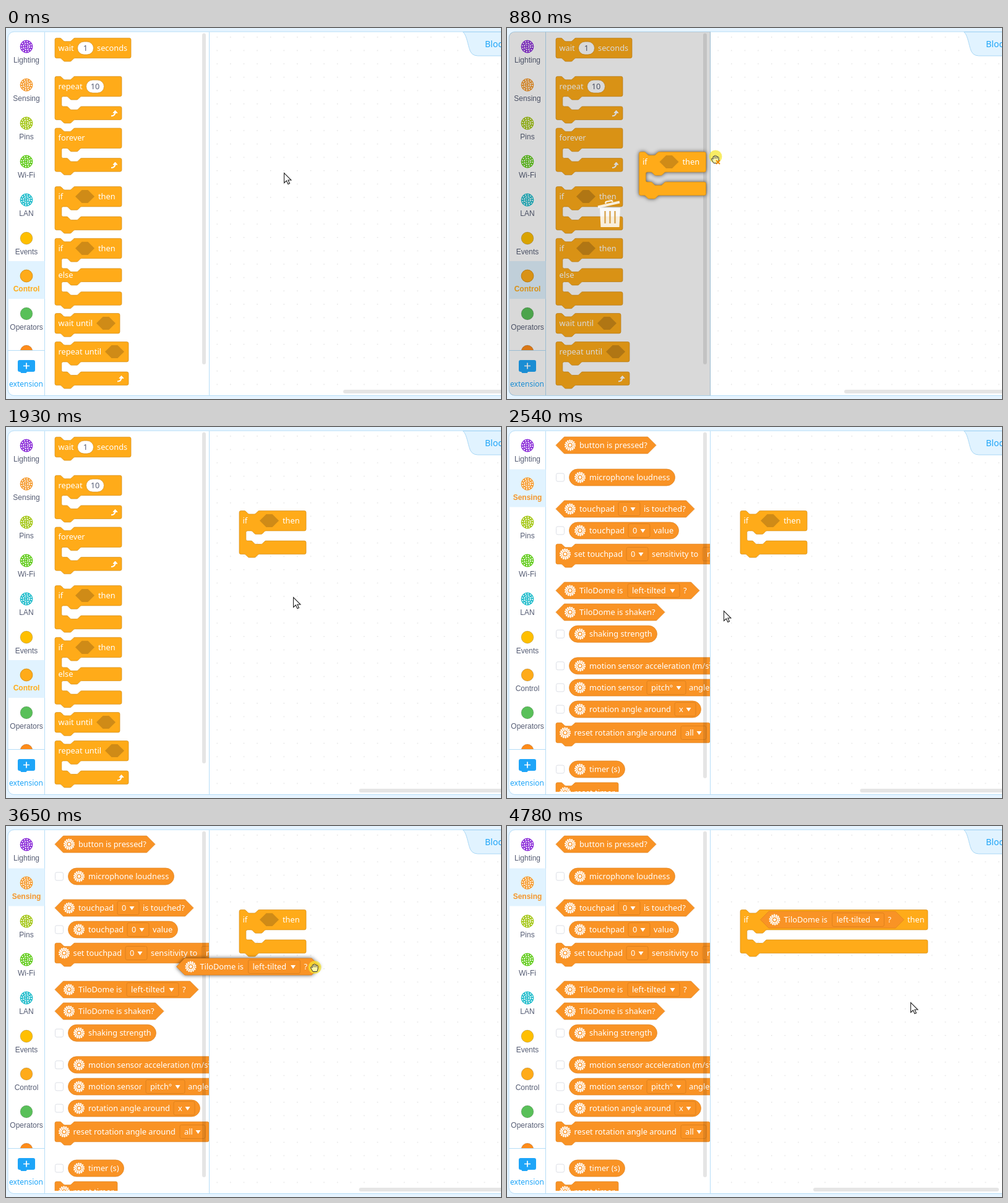
Recreate the animation shown at these times as an HTML page. Size 800 by 600 pixels, loop 5.05 s.

```html
<!DOCTYPE html>
<html lang="en">
<head>
<meta charset="utf-8">
<title>Block editor</title>
<style>
  html, body { margin: 0; width: 100%; height: 100%; overflow: hidden; background: #e6f4ff; }
  svg { display: block; width: 800px; height: 600px; }
  text { font: 12.8px "Noto Sans", sans-serif; fill: #fff; white-space: pre; }
  .side { font: 12px "Liberation Sans", Arial, sans-serif; fill: #575e75; text-anchor: middle; }
  .on { font-weight: bold; }
  .num { fill: #575e75; text-anchor: middle; }
  .blue { font-size: 12px; fill: #1ea5f8; }
  .control { fill: #ffab19; stroke: #cf8b17; }
  .sensing { fill: #f99325; stroke: #dd801c; }
  .slot { fill: #cf8b17; }
  .line { fill: none; stroke: #b5ddf7; }
  .bar { fill: #000; fill-opacity: .1; }
  .lifted { filter: drop-shadow(0 0 3px rgba(0,0,0,.65)); }
  .hidden { display: none; }
</style>
</head>
<body>
<svg id="stage" viewBox="0 0 800 600"></svg>
<script>
const LOOP = 5050, UNIT = 0.675, BOARD = 'TiloDome';

// ---- shapes -------------------------------------------------------------
const NOTCH = 'c2 0 3 1 4 2l4 4c1 1 2 2 4 2h12c2 0 3-1 4-2l4-4c1-1 2-2 4-2';
const NOTCH_BACK = 'c-2 0-3 1-4 2l-4 4c-1 1-2 2-4 2h-12c-2 0-3-1-4-2l-4-4c-1-1-2-2-4-2';
const CORNER = 'a4 4 0 0 1 4 4';

const at = (x, y, content) => `<g transform="translate(${x} ${y})">${content}</g>`;
const label = (x, y, s, cls = '') => `<text x="${x}" y="${y + 4.4}" class="${cls}">${s}</text>`;

// Stack block with one arm per row; a mouth opens between the arms.
function stack(kind, width, arms = 1) {
  const w = width / UNIT;
  let y = 48, d = `M0 4a4 4 0 0 1 4-4H12${NOTCH}H${w - 4}${CORNER}`;
  for (let i = 1; i < arms; i++) {
    d += `V${y - 4}a4 4 0 0 1-4 4H64${NOTCH_BACK}H20a4 4 0 0 0-4 4v16a4 4 0 0 0 4 4H28${NOTCH}H${w - 4}${CORNER}`;
    y += 56;
  }
  d += `V${y - 4}a4 4 0 0 1-4 4H48${NOTCH_BACK}H4a4 4 0 0 1-4-4z`;
  return `<path class="${kind}" transform="scale(${UNIT})" d="${d}"/>`;
}

const hexagon = (cls, x, y, w, r) =>
  `<path class="${cls}" stroke-width=".7" d="M${x} ${y}l${r}-${r}h${w - 2 * r}l${r} ${r}l-${r} ${r}h-${w - 2 * r}z"/>`;
const pill = (x, w, s) =>
  `<rect x="${x}" y="5.8" width="${w}" height="21" rx="10.5" fill="#fff" stroke="#cf8b17" stroke-width=".7"/>` +
  label(x + w / 2, 16.4, s, 'num');
const turnArrow = (x, y) =>
  `<path d="M${x - 5} ${y + 4}q6.5 0 6.5-7" fill="none" stroke="#fff" stroke-width="2"/>` +
  `<path d="M${x - 2} ${y - 1}l3.5-4 3.5 4z" fill="#fff" stroke="#fff" stroke-linejoin="round"/>`;

const dashes = (r, n, color, width, share = .5) => {
  const step = 2 * Math.PI * r / n;
  return `<circle r="${r}" fill="none" stroke="${color}" stroke-width="${width}" ` +
    `stroke-dasharray="${step * share} ${step * (1 - share)}"/>`;
};
const blockRing = (x, y) => at(x, y,
  dashes(8, 14, '#fff', 2, .6) + '<circle r="7.4" fill="#fff"/>' +
  dashes(5.9, 12, '#f99325', 1.3, .45) +
  '<circle r="3.1" fill="#fff" stroke="#f99325" stroke-width="1.4"/>');
const sideRing = (x, y, color) => at(x, y, `<circle r="10.4" fill="${color}"/>` +
  dashes(8.1, 12, '#fff', 1.7) + dashes(5, 8, '#fff', 1.6, .65) + dashes(2.2, 4, '#fff', 1.1, .6));

// ---- palette blocks -----------------------------------------------------
const ifBlock = (w, thenX, inner) => stack('control', w, 2) + label(5.5, 16, 'if') + inner + label(thenX, 16, 'then');
const emptySlot = (x, y = 16) => hexagon('slot', x, y, 31, 10.6);
const smallIf = ifBlock(108, 70, emptySlot(33));

const controlBlocks = [
  [16.3, stack('control', 123) + label(5.5, 16, 'wait') + pill(36.5, 26, '1') + label(68, 16, 'seconds')],
  [78.3, stack('control', 108, 2) + label(5.5, 16, 'repeat') + pill(50.5, 29, '10') + turnArrow(96, 60)],
  [162, stack('control', 108, 2) + label(5.5, 16, 'forever') + turnArrow(96, 60)],
  [256.5, smallIf],
  [340.3, stack('control', 108, 3) + label(5.5, 16, 'if') + emptySlot(33) + label(70, 16, 'then') + label(5.5, 59, 'else')],
  [461.5, stack('control', 105) + label(5.5, 16.5, 'wait until') + emptySlot(67)],
  [507.5, stack('control', 119, 2) + label(5.5, 16, 'repeat until') + emptySlot(81) + turnArrow(106, 60)]
].map(([y, block]) => at(79, y, block)).join('');

// Parts are [x, text] labels or [x, text, width] menus, measured from the block's left edge.
const parts = (y, list) => list.map(([x, s, w]) => !w ? label(x, y, s) :
  `<rect class="sensing" x="${x}" y="${y - 11}" width="${w}" height="22" rx="2.7" stroke-width=".9"/>` +
  label(x + 7, y, s) + `<path d="M${x + w - 15.5} ${y - 2.5}h8l-4 6z" fill="#fff"/>`).join('');
const bool = (w, ...list) => hexagon('sensing', 0, 13.5, w, 13.5) + blockRing(23, 13.5) + parts(13.5, list);
const value = (w, ...list) =>
  '<rect x=".5" y="7" width="13" height="13" rx="2.5" fill="#fff" stroke="#dcdfe6"/>' +
  `<rect class="sensing" x="21.5" width="${w}" height="27" rx="13.5" stroke-width=".7"/>` +
  blockRing(39, 13.5) + parts(13.5, list);
const action = (w, ...list) => stack('sensing', w) + blockRing(15, 16.2) + parts(16.2, list);
const tilted = bool(232, [38, BOARD + ' is'], [116, 'left-tilted', 84], [206, '?']);

const sensingBlocks = [
  [16, bool(162, [38, 'button is pressed?'])],
  [68, value(171, [54, 'microphone loudness'])],
  [119, bool(224, [38, 'touchpad'], [101, '0', 35], [142, 'is touched?'])],
  [154, value(177, [54, 'touchpad'], [117, '0', 35], [158, 'value'])],
  [189.3, action(320, [29.5, 'set touchpad'], [114, '0', 35], [155, 'sensitivity to'], [237, 'medium', 77])],
  [251, tilted],
  [286, bool(176, [38, BOARD + ' is shaken?'])],
  [321.3, value(142, [54, 'shaking strength'])],
  [372.8, value(332, [54, 'motion sensor acceleration (m/s²) on'], [282, 'x', 35], [323, 'axis'])],
  [408, value(249, [54, 'motion sensor'], [147, 'pitch°', 63], [215, 'angle(°)'])],
  [443, value(213, [54, 'rotation angle around'], [192, 'x', 34])],
  [478.3, action(249, [29.5, 'reset rotation angle around'], [202, 'all', 41])],
  [540, value(90, [54, 'timer (s)'])],
  [575, action(101, [29.5, 'reset timer'])]
].map(([y, block]) => at(79, y, block)).join('');

// ---- sidebar ------------------------------------------------------------
const categories = [
  ['Lighting', 30, '#8a2bd8', 1], ['Sensing', 92, '#f59a2e', 1], ['Pins', 154, '#a3c614', 1],
  ['Wi-Fi', 216, '#5fcb18', 1], ['LAN', 278, '#1fbccb', 1], ['Events', 340, '#ffbf00'],
  ['Control', 401, '#ffab19'], ['Operators', 462, '#59c059'], ['', 523, '#ff8c1a']
];
const sideIcons = categories.map(([name, y, color, ring]) =>
  (ring ? sideRing(33, y, color)
        : `<circle cx="33" cy="${y}" r="9.9" fill="${color}" stroke="#000" stroke-opacity=".18"/>`) +
  label(33, y + 21.6, name, 'side')).join('');
const selected = (name, y, top, color) =>
  `<rect x="3.5" y="${top}" width="59" height="61" fill="#e1f3ff"/>` +
  categories.filter(c => c[0] === name).map(([, cy, fill, ring]) =>
    ring ? sideRing(33, cy, fill) : `<circle cx="33" cy="${cy}" r="9.9" fill="${fill}" stroke="#d9921a"/>`).join('') +
  `<text x="33" y="${y + 26}" class="side on" style="fill:${color}">${name}</text>`;

// ---- pointers -----------------------------------------------------------
const arrow = '<path d="M.5.5v16l3.8-3.5 2.6 5.6 2.6-1.2-2.6-5.4h5z" fill="#fff" stroke="#222" stroke-width="1.1"/>';
const hand = fill => `<path d="M-3 6.5L-6.2 1q-1.2-2 .5-2.2L-4 .3V-3.800q1-1.700 2.200 0v-1.300q1.200-1.500 2.300 0v.6q1.300-1.300 2.300.3v.9q1.500-.9 2.300.6V2L3.700 6.500z" fill="${fill}" stroke="#333" stroke-linejoin="round"/>` +
  '<path d="M-1.800-3.500v3M.5-4v3.500M2.800-3.500v3" stroke="#333" stroke-width=".8"/>';
const glow = y => `<circle cy="${y}" r="10.5" fill="#f6e531" fill-opacity=".75"/>`;
const pointers = {
  arrow,
  hover: hand('#fff'),
  grab: glow(-.5) + hand('#fff9a8'),
  trash: glow(-4) + hand('#fff9a8') + '<path d="M1 2l6 6m0-6l-6 6" stroke="#f08a00" stroke-width="2"/>'
};

const trashCan = '<g fill="none" stroke="#fff" stroke-opacity=".85">' +
  '<path d="M147 289.500L182 281.500" stroke-width="4"/><path d="M159 284l1-3 9-2 2 2" stroke-width="2.500"/>' +
  '<path d="M150 291h33l-1.500 31h-30z" fill="#fff" fill-opacity=".85" stroke="none"/>' +
  '<path d="M158.500 296v20M166.500 296v20M174.500 296v20" stroke="#d39a3c" stroke-width="2.500"/></g>';

// ---- scene --------------------------------------------------------------
document.getElementById('stage').innerHTML = `
  <defs>
    <pattern id="dots" x="340.500" y="14" width="21.6" height="21.6" patternUnits="userSpaceOnUse">
      <rect width="1.4" height="1.4" fill="#dedede"/>
    </pattern>
    <clipPath id="flyoutClip"><rect id="clipBox" x="63" y="7"/></clipPath>
    <clipPath id="sideClip"><rect x="3" y="7" width="60" height="514"/></clipPath>
  </defs>
  <rect width="800" height="600" fill="#e6f4ff"/>
  <rect x="3" y="6" width="820" height="588.5" rx="10" fill="#fff" stroke="#b5ddf7"/>
  <rect x="329" y="7" width="471" height="587" fill="url(#dots)"/>
  <path d="M738.500 6.500c5 4 7 15 10 26q3 12.500 14 12.500H801V6.500z" fill="#e1f3ff" stroke="#a9d7f5"/>
  <text x="774" y="31" class="blue" style="font-size:14px">Blocks</text>
  <rect id="hBar" class="bar" y="585" height="6" rx="3" width="300"/>
  <g id="smallIf">${at(377, 135.5, smallIf)}</g>
  <g id="wideIf">${at(377, 135.5, ifBlock(303, 270, at(32.5, 2.6, tilted)))}</g>
  <path class="line" d="M62.500 6.500V594M328.500 6.500V594"/>
  <g clip-path="url(#sideClip)">${sideIcons}
    <g id="controlOn">${selected('Control', 400, 377, '#ffab19')}</g>
    <g id="sensingOn">${selected('Sensing', 92, 68.5, '#f5962a')}</g>
  </g>
  <path class="line" d="M3 521.500H62"/>
  <path d="M22 537h22q3 0 3 3v13q0 3-3 3H34l-1.500 2h-8l-1.500-2h-1q-3 0-3-3v-13q0-3 3-3z" fill="#1ea5f8"/>
  <path d="M28 546.500h10m-5-5v10" stroke="#fff" stroke-width="1.7"/>
  <text x="5" y="580" class="blue">extension</text>
  <g clip-path="url(#flyoutClip)">
    <g id="controlList">${controlBlocks}</g>
    <g id="sensingList">${sensingBlocks}</g>
  </g>
  <rect id="vBar" class="bar" x="317" y="8.500" width="6" rx="3"/>
  <g id="bin"><path d="M329 6v588.500H13q-10 0-10-10V16q0-10 10-10z" fill-opacity=".15"/>${trashCan}</g>
  <g id="dragIf" class="lifted">${smallIf}</g>
  <g id="dragTilt" class="lifted">${tilted}</g>
  <g id="pointer"></g>`;

// time, pointer, pointer x, y, dragged block x, y
const steps = [
  [0, 'arrow', 449, 234], [120, 'arrow', 440, 237], [220, 'arrow', 384, 248], [310, 'arrow', 290, 258],
  [400, 'arrow', 206, 262], [500, 'hover', 169, 274],
  [710, 'grab', 171, 272, 81, 254], [800, 'grab', 226, 250, 112, 242], [880, 'trash', 337, 212, 213.5, 200.5],
  [970, 'grab', 410, 190, 296, 176], [1070, 'grab', 452, 178, 350, 162], [1170, 'grab', 469, 175, 370, 157],
  [1250, 'grab', 470, 176, 372, 158], [1350, 'grab', 473, 166, 375, 147], [1450, 'grab', 475, 154, 377, 135.5],
  [1540, 'hover', 475, 154], [1640, 'hover', 478, 160], [1730, 'arrow', 483, 222],
  [1840, 'arrow', 476, 248], [1930, 'arrow', 464, 275],
  [2390, 'arrow', 377, 307], [2540, 'arrow', 350, 297], [2630, 'arrow', 320, 287],
  [2780, 'arrow', 304, 281], [2870, 'hover', 292, 276], [2950, 'hover', 288, 274], [3040, 'hover', 286, 273],
  [3120, 'hover', 285, 273], [3200, 'grab', 285, 273],
  [3300, 'grab', 290, 271, 82, 249], [3390, 'trash', 322, 263, 100, 242], [3480, 'trash', 404, 246, 178, 231],
  [3560, 'grab', 455, 236, 228, 222], [3650, 'grab', 499, 229, 275.5, 214], [3740, 'grab', 565, 207, 346, 193],
  [3830, 'grab', 600, 196, 392, 178], [3940, 'grab', 608, 182, 402, 160], [4030, 'grab', 612, 172, 407, 151],
  [4120, 'grab', 614, 167, 409, 146], [4210, 'grab', 615, 165, 410, 143], [4300, 'grab', 616, 164, 410, 142],
  [4500, 'hover', 616, 164], [4600, 'arrow', 626, 190], [4690, 'arrow', 642, 250], [4780, 'arrow', 652, 285]
];

const $ = id => document.getElementById(id);
const show = (id, on) => $(id).classList.toggle('hidden', !on);
const move = (id, x, y) => $(id).setAttribute('transform', `translate(${x} ${y})`);
const set = (id, name, v) => $(id).setAttribute(name, v);
let current;

function draw(step) {
  const [t, kind, x, y, dx, dy] = step;
  const between = (a, b) => t >= a && t < b;
  const sensing = t >= 2390, open = between(2780, 3300), dragging = dx !== undefined;
  $('pointer').innerHTML = pointers[kind];
  move('pointer', x, y);
  show('dragIf', dragging && !sensing);
  show('dragTilt', dragging && sensing);
  if (dragging) move(sensing ? 'dragTilt' : 'dragIf', dx, dy);
  show('smallIf', between(1540, 4500));
  show('wideIf', t >= 4500);
  show('bin', between(710, 970) || between(3300, 3560));
  for (const part of ['On', 'List']) {
    show('control' + part, !sensing);
    show('sensing' + part, sensing);
  }
  set('clipBox', 'width', open ? 737 : 265);
  set('clipBox', 'height', open || !sensing ? 587 : 583);
  set('vBar', 'height', sensing ? 559.5 : 535.5);
  set('hBar', 'x', t < 1540 ? 545 : t < 4500 ? 570.5 : 495);
}

function tick(now) {
  const t = now % LOOP;
  const step = steps.findLast(s => s[0] <= t);
  if (step !== current) draw(current = step);
  requestAnimationFrame(tick);
}
draw(current = steps[0]);
requestAnimationFrame(() => tick(performance.now()));
</script>
</body>
</html>
```
